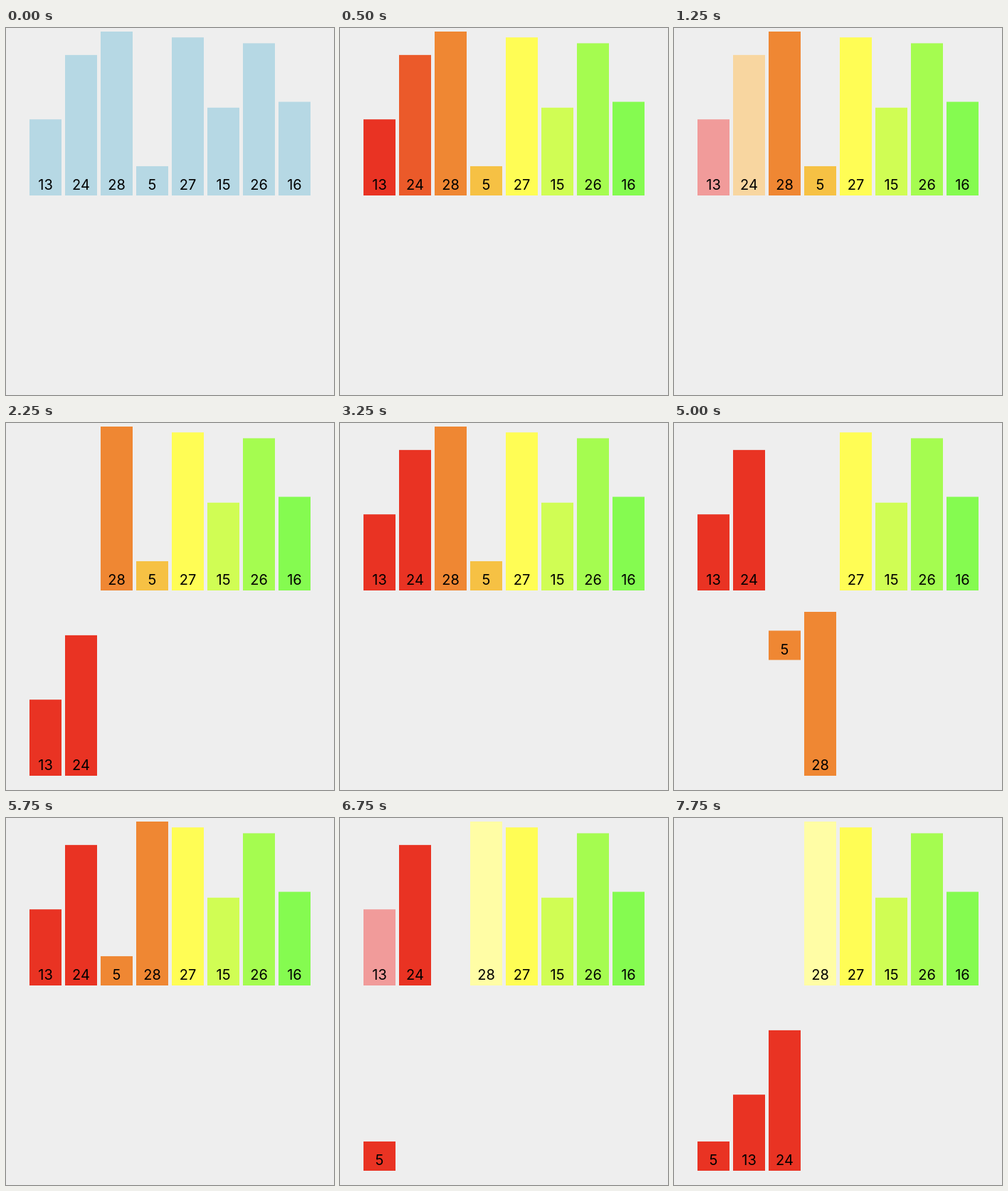
Animation of 461 by 515 pixels, one loop 8 s. Source, as an HTML page with a canvas:

```html
<!DOCTYPE html>
<html lang="en">
<head>
<meta charset="utf-8">
<title>Merge sort</title>
<style>
  html, body { margin: 0; height: 100%; overflow: hidden; background: #eee; }
  canvas { display: block; }
</style>
</head>
<body>
<canvas id="stage" width="461" height="515"></canvas>
<script>
const ctx = document.getElementById('stage').getContext('2d');
const LOOP = 8000, TICK = 250, MOVE = 400, COLOUR_AT = 500;
const values = [13, 24, 28, 5, 27, 15, 26, 16];
const groupColours = ['#e93323', '#eb5a2a', '#ef8733', '#f6c144', '#fffd55', '#d0fd54', '#a5fc50', '#85fb50'];
const paleColours = ['#f19b9a', '#f8d6a0', '#fffda5', '#d3fca3'];

// Comparisons list bars to highlight; moves give bar, column, row and group.
const steps = [
  { at: 1000, compare: [0, 1] },
  { at: 1390, bar: 0, col: 0, row: 1, group: 0 },
  { at: 1830, bar: 1, col: 1, row: 1, group: 0 },
  { at: 2300, bar: 0, col: 0, row: 0, group: 0 },
  { at: 2750, bar: 1, col: 1, row: 0, group: 0 },
  { at: 3300, compare: [2, 3] },
  { at: 3800, bar: 3, col: 2, row: 1, group: 2 },
  { at: 4300, bar: 2, col: 3, row: 1, group: 2 },
  { at: 4750, bar: 3, col: 2, row: 0, group: 2 },
  { at: 5200, bar: 2, col: 3, row: 0, group: 2 },
  { at: 5800, compare: [0, 3] },
  { at: 6150, bar: 3, col: 0, row: 1, group: 0 },
  { at: 6600, compare: [0, 2] },
  { at: 6800, bar: 0, col: 1, row: 1, group: 0 },
  { at: 7200, compare: [1] },
  { at: 7300, bar: 1, col: 2, row: 1, group: 0 }
];

function barsAt(t) {
  const bars = values.map((value, i) => ({ value, col: i, row: 0, group: i, pale: false }));
  for (const s of steps) {
    if (s.at > t) break;
    if (s.compare) {
      s.compare.forEach(i => bars[i].pale = true);
      continue;
    }
    const b = bars[s.bar], p = Math.min(1, (t - s.at) / MOVE);
    b.col += (s.col - b.col) * p;
    b.row += (s.row - b.row) * p;
    b.group = s.group;
    b.pale = false;
  }
  return bars;
}

function draw(t) {
  ctx.fillStyle = '#eee';
  ctx.fillRect(0, 0, 461, 515);
  ctx.font = '20px Inter, "Liberation Sans", sans-serif';
  ctx.textAlign = 'center';
  for (const b of barsAt(t)) {
    const x = 33 + 50 * b.col, bottom = 235 + 260 * b.row, h = b.value * 230 / 28;
    ctx.fillStyle = t < COLOUR_AT ? '#b6d8e4' : (b.pale ? paleColours : groupColours)[b.group];
    ctx.fillRect(x, bottom - h, 45, h);
    ctx.fillStyle = '#000';
    ctx.fillText(b.value, x + 22.5, bottom - 8);
  }
}

const start = performance.now();
function frame() {
  const t = (performance.now() - start) % LOOP;
  draw(Math.floor(t / TICK) * TICK);
  requestAnimationFrame(frame);
}
frame();
</script>
</body>
</html>
```
